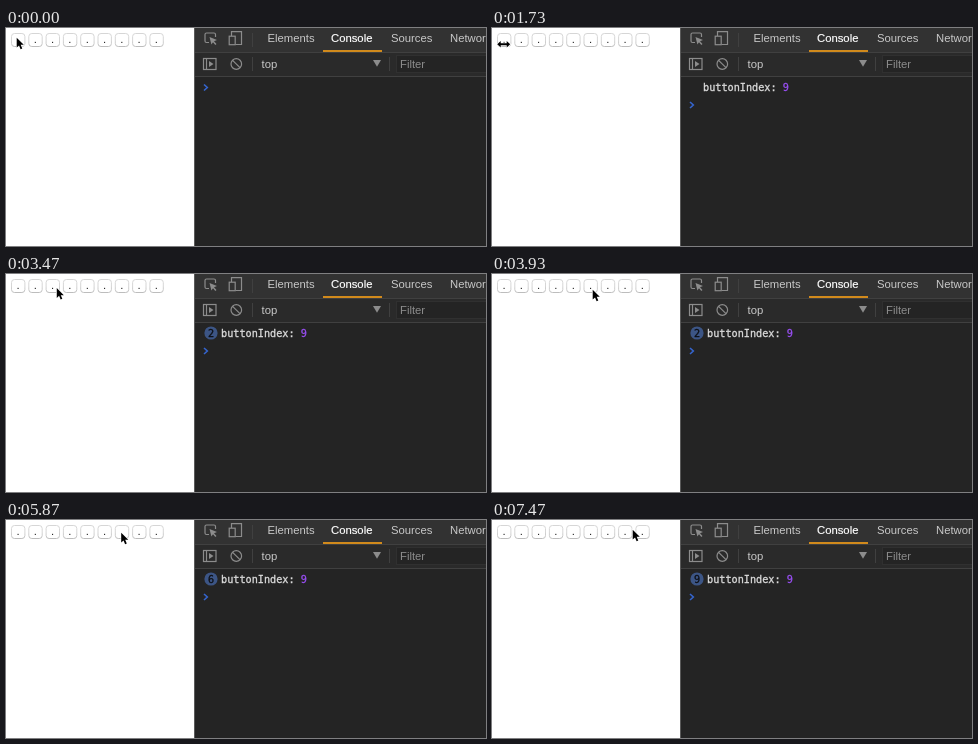
An HTML page that plays this animation: 480 by 218 pixels, repeating every 7.54 s.

```html
<!DOCTYPE html>
<html lang="en">
<head>
<meta charset="utf-8">
<title>Button index console</title>
<style>
  html, body { margin: 0; width: 100%; height: 100%; overflow: hidden; background: #fff; }
  svg { display: block; width: 480px; height: 218px; }
  text { white-space: pre; }
  .ui { font: 11.3px "Liberation Sans", Arial, sans-serif; fill: #c8c8c8; }
  .mono { font: 10.2px "DejaVu Sans Mono", Menlo, monospace; fill: #dcdcdc; stroke: #dcdcdc; stroke-width: .3; }
  .mono .num { fill: #9a4ff5; stroke: #9a4ff5; }
  .mono.dark { fill: #0d0f14; stroke: #0d0f14; }
  .icon { fill: none; stroke: #8c8c8c; stroke-width: 1.2; }
  .line { stroke: #404040; }
</style>
</head>
<body>
<svg viewBox="0 0 480 218">
  <defs>
    <linearGradient id="press" x2="0" y2="1">
      <stop stop-color="#6bb2fa"/>
      <stop offset="1" stop-color="#1c7cf6"/>
    </linearGradient>
    <linearGradient id="edge" x2="0" y2="1">
      <stop offset=".5" stop-color="#d6d6d6"/>
      <stop offset="1" stop-color="#bdbdbd"/>
    </linearGradient>
  </defs>
  <rect width="480" height="218" fill="#fff"/>
  <g id="buttons"></g>

  <rect x="188" width="292" height="218" fill="#242424"/>
  <rect x="188" width="292" height="24" fill="#323232"/>
  <rect x="188" y="24" width="292" height="24" fill="#2a2a2a"/>
  <rect x="188" width="1" height="218" fill="#5a5a5a"/>
  <path class="line" d="M189 24.5H480M189 48.5H480M246.5 5V19M246.5 29V43M383.5 29V43"/>
  <rect x="317" y="22" width="59" height="2" fill="#d18a1c"/>
  <g class="ui">
    <text x="261.500" y="14">Elements</text>
    <text x="325" y="14" style="fill:#fff;stroke:#fff;stroke-width:.2">Console</text>
    <text x="385" y="14">Sources</text>
    <text x="444" y="14">Network</text>
    <text x="255.500" y="40">top</text>
  </g>
  <rect x="390.500" y="27.500" width="100" height="17" fill="#242424" stroke="#303030"/>
  <text class="ui" x="394" y="40" style="fill:#8c8c8c">Filter</text>
  <path d="M367 32H375L371 38.700Z" fill="#8c8c8c"/>

  <g class="icon">
    <path d="M203 14.500H200.500Q199 14.500 199 13V6.500Q199 5 200.500 5H208Q209.500 5 209.500 6.500V9"/>
    <path d="M203.500 9L211 12L208 13.200L210.500 16L209.300 17L207 14.200L205.400 16.500Z" fill="#8c8c8c" stroke="none"/>
    <path d="M225.500 8V3.700H235.500V16.500H229.500"/>
    <rect x="223.200" y="8.200" width="6" height="8.500"/>
    <rect x="197.500" y="30.500" width="12.500" height="11"/>
    <path d="M200.500 30.500V41.500"/>
    <path d="M203 33L207.500 36L203 39Z" fill="#8c8c8c" stroke="none"/>
    <circle cx="230.300" cy="36" r="5.300"/>
    <path d="M226.600 32.300L234 39.700"/>
  </g>

  <g id="log">
    <g id="badge">
      <circle cx="205" cy="59" r="6.600" fill="#3c5585"/>
      <text id="count" class="mono dark" x="205" y="62.700" text-anchor="middle"></text>
    </g>
    <text id="msg" class="mono" y="63">buttonIndex: <tspan class="num">9</tspan></text>
  </g>
  <path id="prompt" d="M198 -3L201.300 0L198 3" fill="none" stroke="#3565cf" stroke-width="1.600"/>

  <g id="arrow">
    <path transform="translate(.7 .7) scale(.93)" d="M0 0V10.600L2.500 8.300L4.200 12.300L6 11.500L4.300 7.600H7.600Z" fill="#000" stroke="#fff" stroke-width="1.400" paint-order="stroke"/>
  </g>
  <g id="resize">
    <path d="M-6.500 0L-3 -3.300V-1H3V-3.300L6.500 0L3 3.300V1H-3V3.300Z" fill="#000" stroke="#fff" stroke-width="1.200" paint-order="stroke"/>
  </g>
  <g id="beam">
    <path d="M-2.500 -5.500Q0 -5.500 0 -4V4Q0 5.500 -2.500 5.500M2.500 -5.500Q0 -5.500 0 -4V4Q0 5.500 2.500 5.500M-1.500 2H1.500" fill="none" stroke="#222"/>
  </g>
</svg>
<script>
const $ = id => document.getElementById(id);
const FPS = 15, LOOP = 7540, LAST = 112;
const CURSORS = ['arrow', 'resize', 'beam'];

// Ticks of 1/15 s: [tick, x, y, cursor]
const path = [
  [0, 10, 9, 'arrow'], [25, 10, 9, 'arrow'],
  [26, 11.7, 16.3, 'resize'], [27, 14, 16, 'arrow'],
  [32, 30, 16.5, 'arrow'], [37, 43.5, 12.5, 'arrow'], [39, 46, 12, 'arrow'],
  [51, 46, 12, 'arrow'], [55, 72, 21, 'arrow'], [59, 100, 15, 'arrow'],
  [69, 100, 15, 'arrow'], [71, 114, 14, 'arrow'],
  [72, 124, 15, 'beam'], [74, 124, 15, 'beam'],
  [75, 122, 14.5, 'beam'], [76, 117, 13, 'arrow'], [77, 114.5, 12, 'arrow'],
  [89, 114.5, 12, 'arrow'], [92, 133, 12, 'arrow'],
  [99, 133, 12, 'arrow'], [104, 151, 10, 'arrow'],
  [111, 151, 10, 'arrow'], [112, 140, 9, 'arrow']
];
// [press tick, release tick, button]
const clicks = [
  [5, 7, 0], [42, 44, 2], [61, 63, 5],
  [81, 83, 6], [84, 85, 6], [87, 88, 6],
  [93, 95, 7], [97, 99, 7], [105, 107, 8]
];

function make(tag, attrs, parent) {
  const el = document.createElementNS('http://www.w3.org/2000/svg', tag);
  for (const k in attrs) el.setAttribute(k, attrs[k]);
  return parent.appendChild(el);
}

const faces = Array.from({ length: 9 }, (_, i) => {
  const x = 5.5 + i * 17.3;
  const face = make('rect', { x, y: 5.5, width: 13.4, height: 13, rx: 3, stroke: 'url(#edge)' }, $('buttons'));
  const dot = make('text', { x: x + 6.5, y: 15, class: 'ui', 'text-anchor': 'middle', style: 'fill:#222' }, $('buttons'));
  dot.textContent = '.';
  return face;
});

function cursorAt(tick) {
  let i = 0;
  while (i < path.length - 1 && path[i + 1][0] <= tick) i++;
  const a = path[i], b = path[i + 1] || a;
  const p = b === a ? 0 : (tick - a[0]) / (b[0] - a[0]);
  const e = p * p * (3 - 2 * p);
  return { x: a[1] + (b[1] - a[1]) * e, y: a[2] + (b[2] - a[2]) * e, kind: a[3] };
}

const show = (id, on) => $(id).setAttribute('visibility', on ? 'inherit' : 'hidden');

function draw(ms) {
  const tick = Math.min(LAST, Math.floor((ms % LOOP + 5) * FPS / 1000));
  const count = clicks.filter(c => c[1] <= tick).length;
  const held = clicks.find(c => c[0] <= tick && tick < c[1]);
  faces.forEach((f, i) => f.setAttribute('fill', held && held[2] === i ? 'url(#press)' : '#fff'));

  show('log', count > 0);
  show('badge', count > 1);
  $('count').textContent = count;
  $('msg').setAttribute('x', count > 1 ? 215 : 211);
  $('prompt').setAttribute('transform', `translate(0 ${count ? 77 : 59.5})`);

  const c = cursorAt(tick);
  for (const id of CURSORS) show(id, id === c.kind);
  $(c.kind).setAttribute('transform', `translate(${c.x} ${c.y})`);
}

const start = performance.now();
function loop() {
  draw(performance.now() - start);
  requestAnimationFrame(loop);
}
loop();
</script>
</body>
</html>
```
